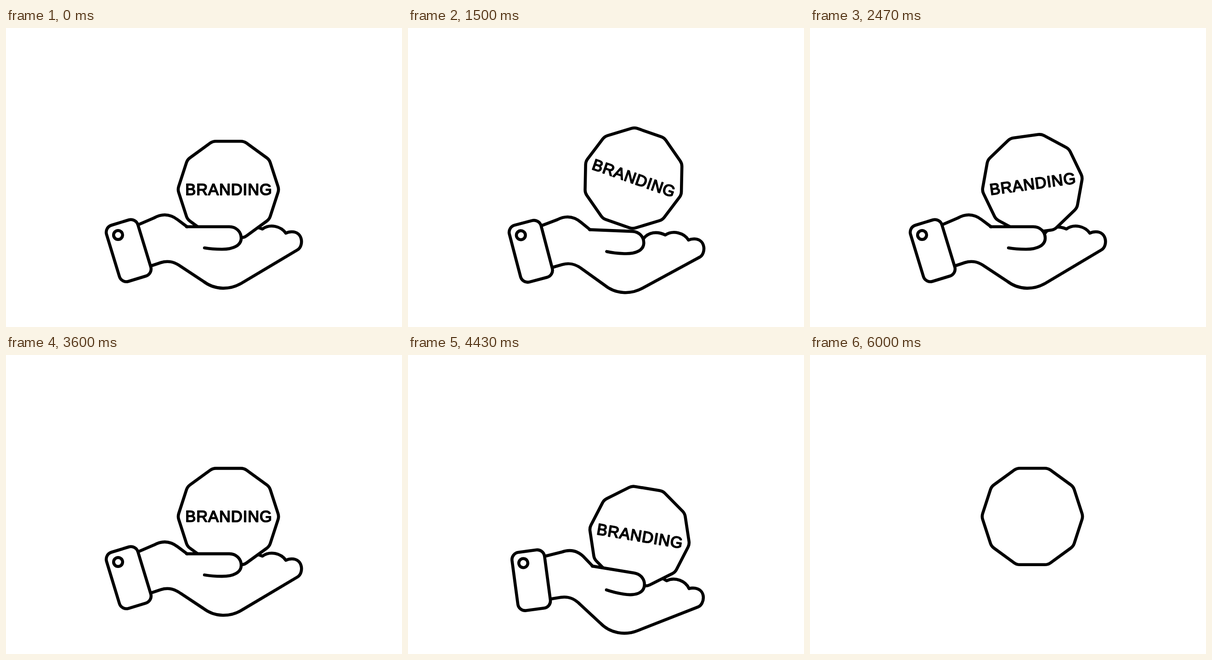
Recreate the animation shown at these times as an HTML page. Size 862 by 650 pixels, loop 6030 ms.

```html
<!DOCTYPE html>
<html lang="en">
<head>
<meta charset="utf-8">
<title>Hand tossing a badge</title>
<style>
  html, body { margin: 0; width: 100%; height: 100%; overflow: hidden; background: #fff; }
  svg { display: block; width: 862px; height: 650px; }
  .line { fill: none; stroke: #000; stroke-width: 6.6; stroke-linecap: round; stroke-linejoin: round; }
  .solid { fill: #fff; }
  text {
    font: 34.4px "Liberation Sans", Arial, sans-serif;
    letter-spacing: 1px; text-anchor: middle;
    stroke: #000; stroke-width: 2; stroke-linejoin: round;
  }
</style>
</head>
<body>
<svg viewBox="0 0 862 650">
  <g id="arm">
    <g class="line skin">
      <path d="M287 428 L322 413 C338 404 356 403 374 417 L394 432"/>
      <path d="M316 517 L337 510 C353 505 366 508 380 518 L430 551 C455 570 488 570 514 554
               L635 482 C648 474 647 443 622 443 C618 443 613 444 609 446
               C599 431 575 425 558 437 C540 429 521 432 511 447"/>
      <rect class="solid" x="231.3" y="420.2" width="71.4" height="127.6" rx="16" transform="rotate(-17 267 484)"/>
      <circle cx="244" cy="450" r="9.8"/>
    </g>
    <g id="badge">
      <path id="decagon" class="line solid"/>
      <text id="label" x="1" y="11.5">BRANDING</text>
    </g>
    <path class="line solid skin" d="M393 432 H486 C501 432 512 443 512 457 C512 472 496 481 470 481 C456 481 443 480 432 478"/>
  </g>
</svg>
<script>
const LOOP = 6030, STEP = 100 / 3;
const SECOND_TOSS = 3030, SECOND_FLIGHT = 3102;
const LABEL_END = 5000, HAND_END = 5995;
const get = id => document.getElementById(id);
const arm = get('arm'), badge = get('badge'), label = get('label');
const skin = document.querySelectorAll('.skin');

// Decagon with slightly rounded corners
function decagonPath(radius, cut) {
  const corner = i => [radius * Math.cos(i * Math.PI / 5), radius * Math.sin(i * Math.PI / 5)];
  const toward = (a, b) => a.map((v, k) => (v + (b[k] - v) * cut).toFixed(2));
  let d = '';
  for (let i = 0; i < 10; i++) {
    const c = corner(i);
    d += `${i ? 'L' : 'M'}${toward(c, corner(i - 1))} Q${c} ${toward(c, corner(i + 1))}`;
  }
  return d + 'Z';
}
get('decagon').setAttribute('d', decagonPath(110.2, 0.1));

const progress = (t, from, to) => Math.min(1, Math.max(0, (t - from) / (to - from)));
const smooth = s => s * s * (3 - 2 * s);
const ease = (t, from, to) => smooth(progress(t, from, to));
const easeLongTail = (t, from, to) => smooth(1 - (1 - progress(t, from, to)) ** 1.8);

// Wind down, swing up, settle
const armAngle = t =>
  14.1 * ease(t, 550, 1225) - 22.1 * ease(t, 1275, 1705) + 8 * easeLongTail(t, 1735, 2485);
const badgeLift = t => 203.5 * (ease(t, 1338, 1955) - ease(t, 1955, 2555));
const badgeSpin = t => 360 * ease(t, 1338, 2575);

function draw(time) {
  const t = Math.floor((time + 4) / STEP) * STEP;
  const second = t > 3000;
  const armTime = second ? t - SECOND_TOSS : t;
  const flightTime = second ? t - SECOND_FLIGHT : t;
  arm.setAttribute('transform', `rotate(${armAngle(armTime)} 233 494)`);
  badge.setAttribute('transform',
    `translate(484 ${351 - badgeLift(flightTime)}) rotate(${badgeSpin(flightTime)})`);
  label.style.display = time < LABEL_END ? '' : 'none';
  skin.forEach(part => part.style.display = time < HAND_END ? '' : 'none');
}

function tick() {
  draw(performance.now() % LOOP);
  requestAnimationFrame(tick);
}
tick();
</script>
</body>
</html>
```
